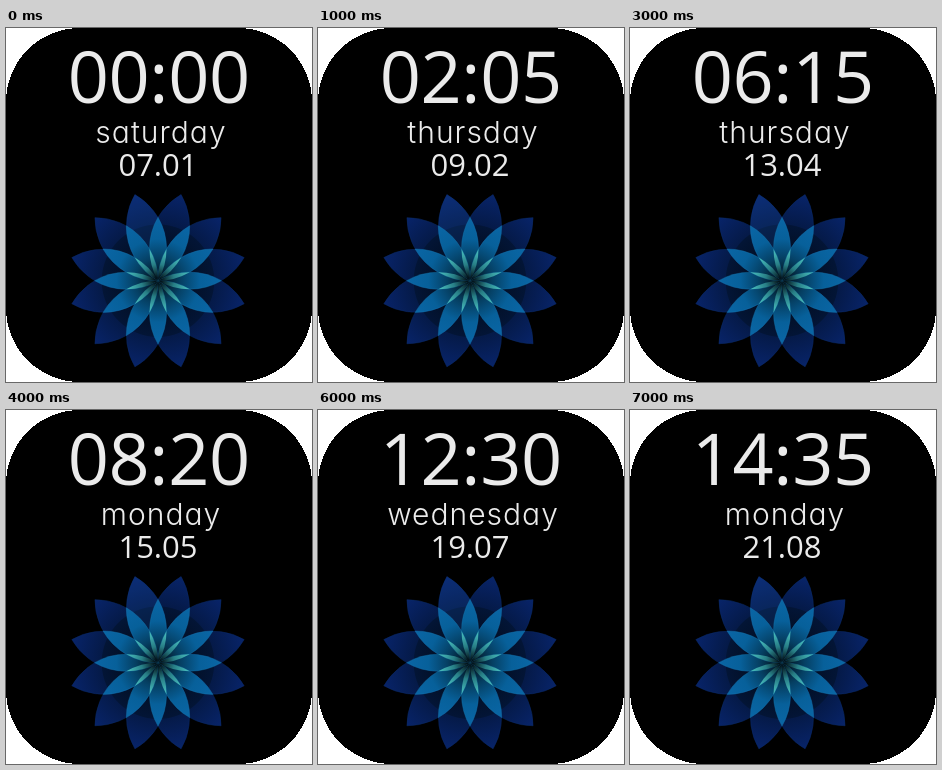
Animation of 306x354 px, one loop 8000 ms. Source, as an HTML page:

```html
<!DOCTYPE html>
<html lang="en">
<head>
<meta charset="utf-8">
<style>
  html, body { margin: 0; width: 100%; height: 100%; overflow: hidden; background: #fff; }
  svg { display: block; }
  text { fill: #ebebeb; text-anchor: middle; }
  .digits { font-family: "Open Sans", sans-serif; }
  #time { font-size: 72px; letter-spacing: -.3px; }
  #day { font: 350 30px Inter, sans-serif; font-feature-settings: "cv11", "ss03"; letter-spacing: 1px; }
  #date { font-size: 31px; }
</style>
</head>
<body>
<svg width="306" height="354" viewBox="0 0 306 354">
  <defs>
    <radialGradient id="outer" gradientUnits="userSpaceOnUse" cx="0" cy="0" r="90">
      <stop offset=".3" stop-color="#020e22"/>
      <stop offset=".62" stop-color="#031536"/>
      <stop offset=".63" stop-color="#051a48"/>
      <stop offset="1" stop-color="#08246a"/>
    </radialGradient>
    <radialGradient id="middle" gradientUnits="userSpaceOnUse" cx="0" cy="0" r="64">
      <stop offset=".08" stop-color="#03141f"/>
      <stop offset=".35" stop-color="#053f62"/>
      <stop offset=".65" stop-color="#07609a"/>
      <stop offset="1" stop-color="#0a66a6"/>
    </radialGradient>
    <radialGradient id="inner" gradientUnits="userSpaceOnUse" cx="0" cy="0" r="33">
      <stop offset=".1" stop-color="#04141b"/>
      <stop offset=".5" stop-color="#287f86"/>
      <stop offset="1" stop-color="#4cc4c4"/>
    </radialGradient>
  </defs>
  <rect width="306" height="354" rx="74" shape-rendering="crispEdges"/>
  <g id="flower" transform="translate(152 252.7)"></g>
  <text id="time" class="digits" x="152.8" y="75"></text>
  <text id="day" x="155" y="114.5"></text>
  <text id="date" class="digits" x="152" y="148"></text>
</svg>
<script>
const byId = id => document.getElementById(id);
const pad = n => String(n).padStart(2, "0");

// A pointed petal: two arcs that leave the centre at the given half angle.
function petal(length, halfAngle) {
  const r = length / (2 * Math.sin(halfAngle * Math.PI / 180));
  return `M0 0A${r} ${r} 0 0 1 0 ${-length}A${r} ${r} 0 0 1 0 0`;
}

function ring(shape, offset) {
  return Array.from({ length: 12 }, (_, i) =>
    `<g transform="rotate(${offset + i * 30})">${shape}</g>`).join("");
}

// Neighbouring petals overlap in narrower, shorter petals of the same kind.
byId("flower").innerHTML =
  ring(`<path d="${petal(89.2, 45)}" fill="url(#outer)" stroke="#0a2a66" stroke-width=".5"/>`, 15) +
  `<path d="${petal(89.2, 45)}" fill="#1a55b0" opacity=".2" transform="rotate(-15)"/>` +
  ring(`<path d="${petal(63.4, 30)}" fill="url(#middle)" stroke="#1676ad" stroke-width=".4"/>`, 0) +
  ring(`<path d="${petal(32.8, 15)}" fill="url(#inner)"/>`, 15);

let shown = -1;
function draw(now) {
  const step = Math.floor(now / 1000) % 8;
  if (step !== shown) {
    shown = step;
    const date = new Date(2023, step, 7 + 2 * step);
    byId("time").textContent = `${pad(2 * step)}:${pad(5 * step)}`;
    byId("day").textContent = date.toLocaleDateString("en", { weekday: "long" }).toLowerCase();
    byId("date").textContent = `${pad(date.getDate())}.${pad(date.getMonth() + 1)}`;
  }
  requestAnimationFrame(draw);
}
draw(performance.now());
</script>
</body>
</html>
```
